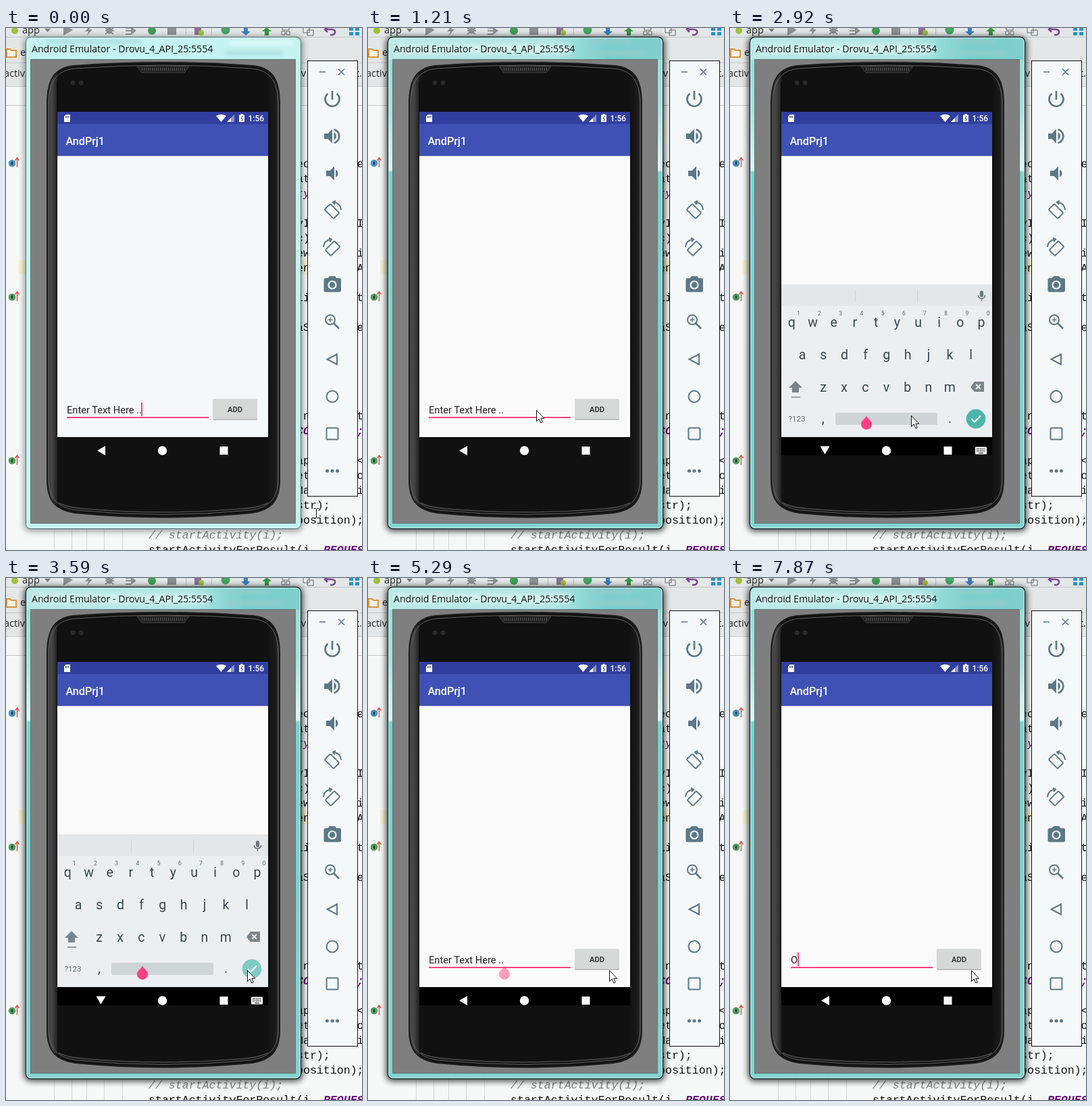
Animation, 527 px wide and 772 px high, one loop 8000 ms. Source, as an HTML page:

```html
<!DOCTYPE html>
<html lang="en">
<head>
<meta charset="utf-8">
<title>Emulator text entry</title>
<style>
  html, body { margin: 0; width: 100%; height: 100%; overflow: hidden; background: #f6f8f8; }
  svg { display: block; width: 100%; height: 100%; }
  text { white-space: pre; font-family: Roboto, sans-serif; }
  .ui { font-family: "Open Sans", "Noto Sans", sans-serif; }
  #code text { font: 16.6px "Liberation Mono", monospace; fill: #111; }
  #code .field, #code .const { fill: #660e7a; font-style: italic; }
  #code .const { font-weight: bold; }
  #code .comment { fill: #808080; font-style: italic; }
  .line { fill: none; stroke: #5b7886; stroke-width: 2; }
  .thin { stroke-width: 1.5; }
  .bold { stroke-width: 2.7; }
  .solid { fill: #5b7886; }
  .key { font-size: 19.5px; fill: #37474f; text-anchor: middle; }
  .digit { font-size: 8.5px; fill: #59666c; text-anchor: middle; }
  .pink { fill: #ff4081; }
</style>
</head>
<body>
<svg viewBox="0 0 527 772" preserveAspectRatio="none">
  <defs>
    <linearGradient id="glassActive" x2="0" y2="1">
      <stop offset="0" stop-color="#93dad7"/><stop offset=".15" stop-color="#a9e2df"/>
      <stop offset=".27" stop-color="#e0f5f4"/><stop offset=".275" stop-color="#79d2cf"/>
      <stop offset="1" stop-color="#84d3d1"/>
    </linearGradient>
    <linearGradient id="titleActive">
      <stop offset="0" stop-color="#b9e9e7"/><stop offset=".6" stop-color="#aee5e3"/>
      <stop offset=".8" stop-color="#76d0ce"/><stop offset="1" stop-color="#80cfcd"/>
    </linearGradient>
    <linearGradient id="body">
      <stop offset="0" stop-color="#303030"/><stop offset=".018" stop-color="#484848"/>
      <stop offset=".04" stop-color="#262626"/><stop offset=".046" stop-color="#111"/>
      <stop offset=".95" stop-color="#111"/><stop offset=".985" stop-color="#1c1c1c"/>
      <stop offset="1" stop-color="#3a3a3a"/>
    </linearGradient>
    <filter id="soft" x="-30%" y="-60%" width="160%" height="220%"><feGaussianBlur stdDeviation="3"/></filter>
    <filter id="shade" x="-10%" y="-10%" width="120%" height="120%"><feGaussianBlur stdDeviation="5"/></filter>
    <clipPath id="screenClip"><rect x="76" y="124" width="312" height="481"/></clipPath>
    <path id="shell" d="M61 112C61 76 72 59 100 56Q233 46 366 56C394 59 405 76 405 112V668C405 702 390 713 364 717Q233 730 102 717C76 713 61 702 61 668Z"/>
  </defs>

  <!-- editor behind the windows -->
  <rect width="527" height="772" fill="#f6f8f8"/>
  <rect width="527" height="86" fill="#e4e7e7"/>
  <path d="M0 13.5H527M0 51.5H527M0 86.5H527M0 114.5H527" stroke="#c4c9c9"/>
  <path d="M71.5 740V772M97.5 740V772M119.5 740V772M145.5 740V772M172.5 740V772" stroke="#d3d7d7"/>
  <rect x="18" y="343" width="430" height="21" fill="#f8f4d6"/>
  <g id="toolbar">
    <circle cx="13" cy="4" r="5" fill="#9fbf3b"/>
    <text class="ui" x="24" y="8" font-size="14.5" fill="#222">app</text>
    <path d="M57 1h9l-4.500 5z" fill="#777"/>
    <path d="M85-5l14 8-14 8zM124-3l-7 8h5l-2 6 8-9h-5l3-5zM239-2h13v12h-13z" fill="#8b9090"/>
    <path d="M147 0l12 9M147 9l12-9M147 4h13M177 0h8M177 4h8M177 9h8" stroke="#8b9090" stroke-width="2"/>
    <circle cx="153" cy="4" r="4.500" fill="#8b9090"/><path d="M185-2l8 6-8 6z" fill="#8b9090"/>
    <circle cx="216" cy="4" r="6" fill="#3f9f54"/>
    <path d="M266.500 0V10M304.500 0V10" stroke="#bbb"/>
    <path d="M279-2h10v12h-10z" fill="#8a6f96"/><circle cx="289" cy="7" r="4" fill="#9fbf3b"/>
    <circle cx="325" cy="3" r="6.500" fill="#45a562"/>
    <path d="M352-2h6v7h4l-7 6-7-6h4z" fill="#3d7fc0"/><path d="M386-1l7 6h-4v6h-6v-6h-4z" fill="#36963f"/>
    <path d="M409-2h10v5h-10zM408 5h5v5h-5zM415 5h5v5h-5zM440-1h9v8h-9zM446 3h9v8h-9z" fill="#e8ecec" stroke="#666"/>
    <path d="M472 2h9q7 0 6 5-1 4-7 3M476-2l-4 4 4 4" fill="none" stroke="#7d4793" stroke-width="2.500"/>
    <path d="M508-1h6v5h-6zM517-1h6v5h-6zM508 6h6v5h-6zM517 6h6v5h-6z" fill="#2493d1"/>
  </g>
  <path d="M1 31h5l2 2h7v10H1z" fill="#faf1df" stroke="#d99442" stroke-width="2"/>
  <g font-size="14.500" fill="#222">
    <text class="ui" x="21" y="41">e</text><text class="ui" x="-3" y="72">activ</text>
    <text class="ui" x="428" y="72">tiv</text><text class="ui" x="518" y="72">t.</text>
  </g>
  <g id="marks"></g>
  <g id="code"></g>

  <!-- emulator window -->
  <rect id="shadow" x="27" y="13" width="412" height="731" rx="9" filter="url(#shade)"/>
  <g id="idleFrame">
    <rect x="29.500" y="13.500" width="407" height="727" rx="7" fill="#c5f3f1" stroke="#466c6c"/>
    <g filter="url(#soft)"><path d="M325 37H410M60 20H200" stroke="#a9dcdf" stroke-width="6"/><path d="M330 22H425" stroke="#dcfaf8" stroke-width="6"/></g>
  </g>
  <g id="activeFrame">
    <rect x="29.500" y="13.500" width="407" height="727" rx="7" fill="url(#glassActive)" stroke="#172e2e" stroke-width="1.400"/>
    <path d="M31 47V21Q31 15 37 15H429Q435 15 435 21V47Z" fill="url(#titleActive)"/>
    <g filter="url(#soft)"><path d="M40 31H300" stroke="#d3f2f0" stroke-width="14"/><path d="M325 37H410M330 20H390" stroke="#9bc9ca" stroke-width="5"/></g>
  </g>
  <rect x="30.800" y="14.800" width="404.400" height="724.400" rx="6" fill="none" stroke="#e8fffd" stroke-opacity=".7"/>
  <text class="ui" x="38" y="36" font-size="14.100" fill="#111">Android Emulator - Drovu_4_API_25:5554</text>
  <rect x="36.500" y="46.500" width="392" height="686" fill="#7f7f7f" stroke="#5c7878"/>

  <use href="#shell" fill="url(#body)" stroke="#1b1b1b" stroke-width="2"/>
  <use href="#shell" fill="none" stroke="#666" transform="translate(2.800 4.650) scale(.988)"/>
  <path d="M78 702Q90 709 116 711Q233 721 350 711Q376 709 388 702" fill="none" stroke="#4b4b4b" stroke-width="1.500"/>
  <path d="M76 80V604" stroke="#050505"/>
  <path d="M194 57Q233 55 271 57L264 66H201Z" fill="#222" stroke="#444"/>
  <path d="M201 61H265" stroke="#555" stroke-width="4" stroke-dasharray="1 2"/>
  <circle cx="99" cy="81" r="3.500" fill="#292929"/><circle cx="111" cy="81" r="3.500" fill="#292929"/>

  <!-- phone screen -->
  <rect id="screen" x="76" y="124" width="312" height="481"/>
  <path d="M76 124H388V142H76Z" fill="#303f9f"/><path d="M76 142H388V189H76Z" fill="#3f51b5"/>
  <path d="M76 189.500H388" stroke="#c3c6d2"/>
  <g fill="#fff">
    <path d="M88.500 128H95V139H86V131Z"/><path d="M311 130Q318.500 125.500 326 130L318.500 139Z"/>
    <path d="M338 128V139H327Z" opacity=".45"/><path d="M333 133V139H327Z"/>
    <path d="M347.500 127H350.500V128.500H353V139H345V128.500H347.500Z"/>
    <text x="358.500" y="138" font-size="12" font-weight="500">1:56</text>
    <text x="88.500" y="173" font-size="16.100" font-weight="500">AndPrj1</text>
  </g>
  <path d="M88.500 130v3M90.500 130v3M92.500 130v3" stroke="#303f9f"/><path d="M350 130l-2 4h2l-1 4" fill="none" stroke="#303f9f"/>
  <text id="entry" x="90" y="570" font-size="14.650" fill="#222"></text>
  <rect x="90" y="575" width="210" height="2" class="pink"/>
  <rect id="caret" y="554" width="2" height="20" class="pink"/>
  <rect x="306" y="549.500" width="66" height="30.500" rx="2" fill="#b4b6b6"/>
  <rect x="306" y="548.500" width="66" height="30" rx="2" fill="#d6d7d7"/>
  <text x="339" y="567.500" font-size="11.200" font-weight="500" text-anchor="middle" fill="#222">ADD</text>

  <g clip-path="url(#screenClip)"><g id="keyboard">
    <rect x="76" y="380" width="312" height="250" fill="#eceff1"/>
    <rect x="76" y="379" width="312" height="32" fill="#e4e7e9"/>
    <path d="M185.500 387V406M277.500 387V406" stroke="#d0d5d7"/>
    <rect x="370" y="388.500" width="5" height="9.500" rx="2.500" fill="#6b767b"/>
    <path d="M367.500 395Q367.500 400 372.500 400T377.500 395M372.500 400V404" fill="none" stroke="#6b767b" stroke-width="1.500"/>
    <path d="M97 522L107 532H102V539H92V532H87Z" fill="#78848a"/><path d="M91 546H104" stroke="#78848a" stroke-width="1.500"/>
    <path d="M356 531L362 523H376V538H362Z" fill="#78848a"/><path d="M364 527L371 534M371 527L364 534" stroke="#eceff1" stroke-width="1.800"/>
    <text x="99" y="582" font-size="11.500" text-anchor="middle" fill="#5d6a70">?123</text>
    <rect x="156" y="569" width="151" height="18" rx="2" fill="#cfd4d6"/>
    <circle id="done" cx="364" cy="578" r="14.300"/>
    <path d="M357.500 578L362 582.500L371 573.500" fill="none" stroke="#fff" stroke-width="2"/>
  </g></g>

  <rect id="navBar" x="76" y="605" width="312" height="27" fill="#000"/>
  <path id="back" d="M135 625L147 618V632Z" fill="#fff"/>
  <circle cx="231.500" cy="625" r="6.700" fill="#fff"/><path d="M316.500 619H328.500V631H316.500Z" fill="#fff"/>
  <g id="imeIcon"><rect x="363" y="619.500" width="17" height="11" rx="1" fill="#fff"/>
    <path d="M365 622.500H378M365 625.500H378" stroke="#000" stroke-width="1.500" stroke-dasharray="1.500 1"/><path d="M368 628.500H375" stroke="#000"/></g>
  <path id="handle" class="pink" d="M202 574Q204 577 207.300 580A8 8 0 1 1 196.700 580Q200 577 202 574Z"/>

  <!-- emulator controls -->
  <rect x="446.500" y="48.500" width="74" height="644" fill="#f5f8f8" stroke="#111"/>
  <path class="line thin" d="M464 65H473M492 60.500L501 69.500M501 60.500L492 69.500"/>
  <path class="line bold" d="M483 93V106M476.500 97A10.500 10.500 0 1 0 489.500 97"/>
  <path class="solid" d="M471 156H476.500L483 149.500V170.500L476.500 164H471ZM485.500 154.500Q489 156.500 489 160T485.500 165.500Z"/>
  <path class="line bold" d="M485.500 150A10.300 10.300 0 0 1 485.500 170"/>
  <path class="solid" d="M474 211H479.500L486 204.500V225.500L479.500 219H474ZM488 209.500Q491.500 211.500 491.500 215T488 220.500Z"/>
  <g id="rotate" class="line">
    <rect x="476.500" y="261.500" width="12" height="19" rx="1.500" transform="rotate(-45 482.500 271)"/>
    <path d="M484 257.500Q495 258.500 496 269M488 255.500L484 257.500L487 261"/>
  </g>
  <use href="#rotate" transform="translate(966 55) scale(-1 1)"/>
  <path class="solid" d="M479 367H487L489.500 370H493.500Q496 370 496 372.500V388Q496 390.500 493.500 390.500H473Q470.500 390.500 470.500 388V372.500Q470.500 370 473 370H476.500Z"/>
  <circle cx="483" cy="380" r="5.500" fill="#5b7886" stroke="#f5f8f8" stroke-width="2.200"/>
  <circle class="line" cx="480" cy="431.500" r="7"/>
  <path class="line bold" d="M485 436.500L493 444.500"/><path class="line thin" d="M476.500 431.500H483.500M480 428V435"/>
  <path class="line" d="M475.500 490L490 482.500V497.500Z"/><circle class="line" cx="483" cy="545" r="8.500"/>
  <rect class="line" x="474.500" y="591.500" width="17" height="17" rx="1.500"/>
  <g class="solid"><circle cx="475.500" cy="655" r="2.500"/><circle cx="483" cy="655" r="2.500"/><circle cx="490.500" cy="655" r="2.500"/></g>

  <path id="beam" d="M455.500 710.500H458.500L459.500 711.500L460.500 710.500H463.500M459.500 711V724M455.500 724.500H458.500L459.500 723.500L460.500 724.500H463.500" fill="none" stroke="#111"/>
  <path id="arrow" d="M.5.500V16.500L4.300 13L6.800 19L9.300 18L6.800 12.200H11.700Z" fill="#fff" stroke="#111"/>
</svg>
<script>
const $ = id => document.getElementById(id);
const make = (parent, tag, attrs, text = "") => {
  const el = document.createElementNS("http://www.w3.org/2000/svg", tag);
  for (const name in attrs) el.setAttribute(name, attrs[name]);
  el.textContent = text;
  parent.append(el);
  return el;
};

// Editor lines: rows counted upwards from the comment, with the panel hiding the middle.
const codeRows = [
  [1, "position);"], [2, "str);"], [3, "Ma       i"], [4, "et       o"], [5, "ap       <"],
  [7, "CO       ;", "const"], [8, "(n       t"], [14, "aS       e"], [16, "li       t"],
  [18, "en       A"], [19, "ew       i"], [20, "c)"], [21, "yI       I"],
  [23, "ty", "field"], [24, "at"], [25, "ec       e"]
];
const rowY = n => 755 - 21.96 * n;
for (const [n, str, cls = ""] of codeRows)
  make($("code"), "text", { x: 430, y: rowY(n), class: cls }, str);
make($("code"), "text", { x: 211, y: rowY(0), class: "comment" }, "// startActivity(i);");
const call = make($("code"), "text", { x: 211, y: rowY(-1) }, "startActivityForResult(i, ");
make(call, "tspan", { class: "const" }, "REQUES");

for (const [y, color] of [[200, "#4a94c8"], [398, "#4f9f5c"], [640, "#4f9f5c"]]) {
  make($("marks"), "circle", { cx: 9, cy: y, r: 5.3, fill: color });
  make($("marks"), "path", { d: `M9 ${y - 2.5}v5`, stroke: "#1d3a30", "stroke-width": 2 });
  make($("marks"), "path", { d: `M16.500 ${y + 6}V${y - 7}M13.500 ${y - 4}l3-4 3 4`, fill: "none", stroke: "#d75a4a", "stroke-width": 1.5 });
}

const keyRow = (letters, x, y) => [...letters].forEach((c, i) =>
  make($("keyboard"), "text", { x: x + 31.2 * i, y, class: "key" }, c));
keyRow("qwertyuiop", 91.3, 442);
keyRow("asdfghjkl", 107, 490);
keyRow("zxcvbnm", 138, 537.5);
keyRow(",", 138, 584);
keyRow(".", 325.5, 584);
[..."1234567890"].forEach((c, i) =>
  make($("keyboard"), "text", { x: 101.3 + 31.2 * i, y: 425, class: "digit" }, c));

// Each track is a list of [start time, value]; values hold until the next entry.
const at = (track, t) => track.reduce((v, [start, next]) => t >= start ? next : v, track[0][1]);
const phrase = "Enter Text Here ..";
const texts = [[0, phrase], [6320, phrase.slice(0, 17)], [6740, phrase.slice(0, 14)],
  [6860, phrase.slice(0, 10)], [6980, phrase.slice(0, 6)], [7140, "E"], [7290, ""], [7870, "O"]];
const caretFlips = [250, 790, 1210, 1460, 4300, 4700, 5290, 5730, 6190, 6320, 7720, 7870];
const pointer = [[0, null], [400, [415, 660]], [520, [354, 568]], [670, [320, 570]],
  [790, [284, 570]], [940, [263, 567]], [1070, [249, 565]], [2920, [268, 573]],
  [3040, [296, 586]], [3190, [322, 584]], [3315, [344, 581]], [3440, [357, 580]]];
const keyboardDrop = [[0, null], [1460, 27], [1610, 0], [3720, 29], [3870, null]];
const handleAlpha = [[0, 0], [1460, 1], [5290, .5], [5450, 0]];

const show = (id, on) => { $(id).style.display = on ? "" : "none"; };

function draw(t) {
  const active = t >= 1210;
  show("activeFrame", active);
  show("idleFrame", !active);
  $("shadow").setAttribute("opacity", active ? .75 : .4);
  $("screen").setAttribute("fill", active ? "#fafafa" : "#f5f8f8");

  $("entry").textContent = at(texts, t);
  $("caret").setAttribute("x", Math.floor(90 + $("entry").getComputedTextLength()));
  show("caret", caretFlips.filter(flip => t >= flip).length % 2 === 0);

  const drop = at(keyboardDrop, t), up = drop !== null;
  show("keyboard", up);
  show("imeIcon", up && t < 3720);
  $("keyboard").setAttribute("transform", `translate(0 ${drop || 0})`);
  $("keyboard").setAttribute("opacity", drop ? .7 : 1);
  $("done").setAttribute("fill", t >= 3590 ? "#80cbc4" : "#4db6ac");
  show("navBar", t >= 1460);
  $("back").setAttribute("transform", `rotate(${up ? (drop ? -45 : -90) : 0} 140.500 625)`);
  $("handle").setAttribute("opacity", at(handleAlpha, t));

  const pos = at(pointer, t);
  show("beam", !pos);
  show("arrow", pos);
  if (pos) $("arrow").setAttribute("transform", `translate(${pos})`);
}

const start = performance.now();
function tick() {
  draw((performance.now() - start) % 8000);
  requestAnimationFrame(tick);
}
tick();
</script>
</body>
</html>
```
